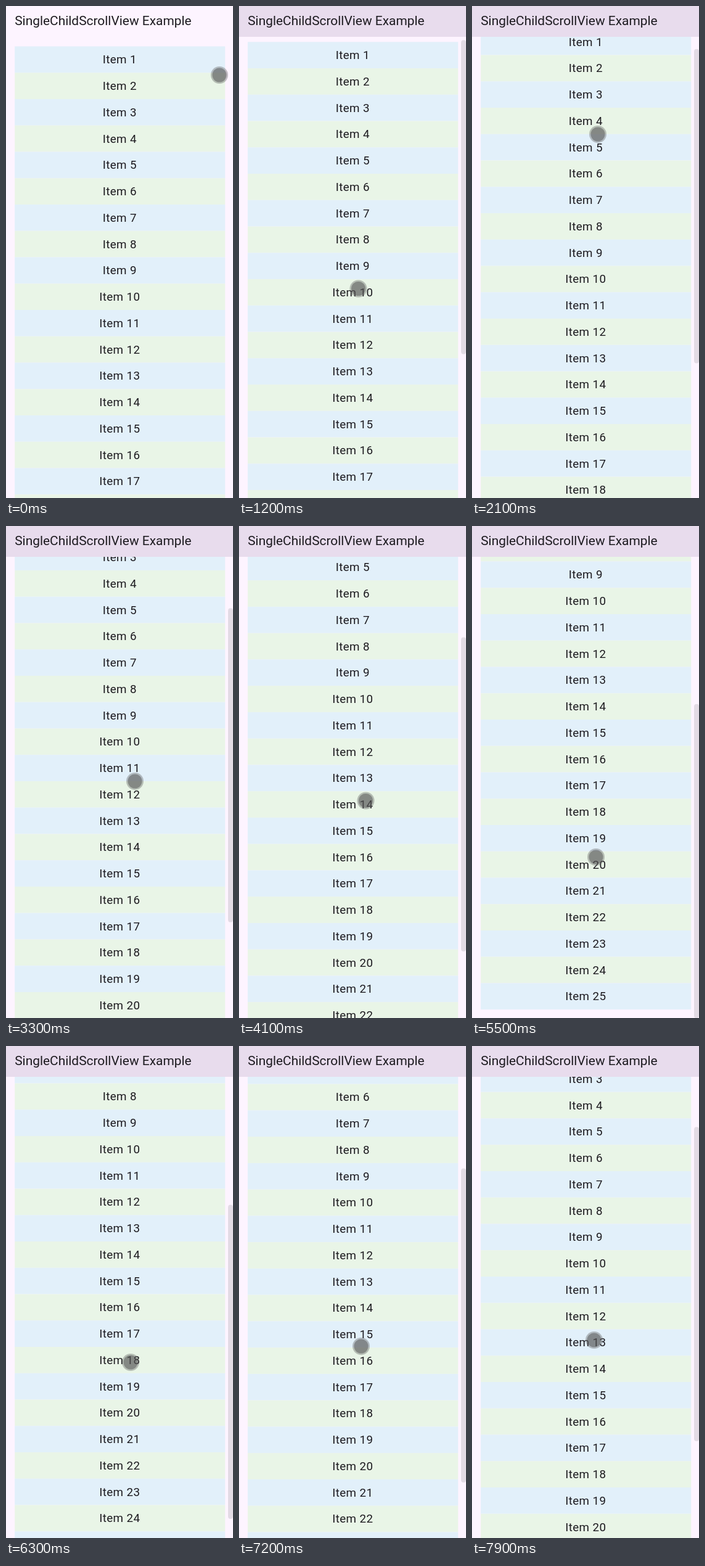
An HTML page with a canvas for the animation above (8000 ms loop, 368 by 798 pixels).

```html
<!DOCTYPE html>
<html lang="en">
<head>
<meta charset="utf-8">
<title>SingleChildScrollView Example</title>
<style>
  html, body { margin: 0; width: 100%; height: 100%; overflow: hidden; background: #fdf4ff; }
  canvas { display: block; }
</style>
</head>
<body>
<canvas id="stage" width="368" height="798"></canvas>
<script>
const ctx = document.getElementById('stage').getContext('2d');
const WIDTH = 368, HEIGHT = 798, LOOP = 8000, STEP = 100;
const BAR = 50, LIST_TOP = 65.5, ROW = 42.75, ITEMS = 25;
const VIEW = HEIGHT - BAR, CONTENT = VIEW + 350;
const SURFACE = '#fdf4ff';

// Key poses of the gesture; everything between them is linear.
const poses = [
  { t: 0, scroll: 0, x: 346, y: 112 },
  { t: 900, scroll: 0, x: 190, y: 542 },
  { t: 2100, scroll: 28.7, x: 204, y: 208 },
  { t: 3300, scroll: 121.8, x: 209, y: 414 },
  { t: 4900, scroll: 260.3, x: 202, y: 477 },
  { t: 5300, scroll: 350, x: 175, y: 139 },
  { t: 5500, scroll: 350, x: 201, y: 537 },
  { t: 5700, scroll: 350, x: 201, y: 537 },
  { t: 6300, scroll: 304.2, x: 202, y: 513 },
  { t: 7200, scroll: 217.6, x: 198, y: 487 },
  { t: 7900, scroll: 119, x: 198, y: 477 }
];

function poseAt(t) {
  const i = Math.max(1, poses.findIndex(p => p.t >= t));
  const a = poses[i - 1], b = poses[i];
  const p = (t - a.t) / (b.t - a.t);
  const mix = key => a[key] + (b[key] - a[key]) * p;
  return { scroll: mix('scroll'), x: mix('x'), y: mix('y') };
}

function box(x, y, width, height, color) {
  ctx.fillStyle = color;
  ctx.fillRect(x, y, width, height);
}

function disc(x, y, radius, color) {
  ctx.fillStyle = color;
  ctx.beginPath();
  ctx.arc(x, y, radius, 0, Math.PI * 2);
  ctx.fill();
}

function label(text, x, y, size, spacing, align) {
  ctx.font = `${size}px Roboto, sans-serif`;
  ctx.letterSpacing = spacing + 'px';
  ctx.textAlign = align;
  ctx.fillStyle = '#1d1b20';
  ctx.fillText(text, x, y);
}

function drawList(scroll) {
  for (let i = 0; i < ITEMS; i++) {
    const y = LIST_TOP + i * ROW - scroll;
    box(14.2, y, 341, ROW, i % 2 ? '#e9f5e7' : '#e2f0fa');
    label('Item ' + (i + 1), 184.3, y + 27.8, 18.8, 0.4, 'center');
  }
}

function drawThumb(scroll) {
  const ratio = VIEW / CONTENT;
  ctx.fillStyle = 'rgba(0, 0, 0, 0.1)';
  ctx.beginPath();
  ctx.roundRect(360, BAR + 0.3 + scroll * ratio, 8, VIEW * ratio, 4);
  ctx.fill();
}

function draw(t) {
  const { scroll, x, y } = poseAt(t);
  const scrolled = Math.min(1, Math.max(0, (t - 900) / 300));

  box(0, 0, WIDTH, HEIGHT, SURFACE);
  drawList(scroll);
  box(0, 0, WIDTH, BAR, SURFACE);

  ctx.globalAlpha = scrolled;
  drawThumb(scroll);
  box(0, 0, WIDTH, BAR, '#e8dced');
  ctx.globalAlpha = 1;
  label('SingleChildScrollView Example', 14.2, 30.5, 20.9, 0, 'left');

  disc(x, y, 14, 'rgba(96, 96, 96, 0.38)');
  disc(x, y, 11.5, 'rgba(80, 80, 80, 0.48)');
}

const start = performance.now();
function tick() {
  const t = (performance.now() - start) % LOOP;
  draw(Math.floor(t / STEP) * STEP);
  requestAnimationFrame(tick);
}
tick();
</script>
</body>
</html>
```
